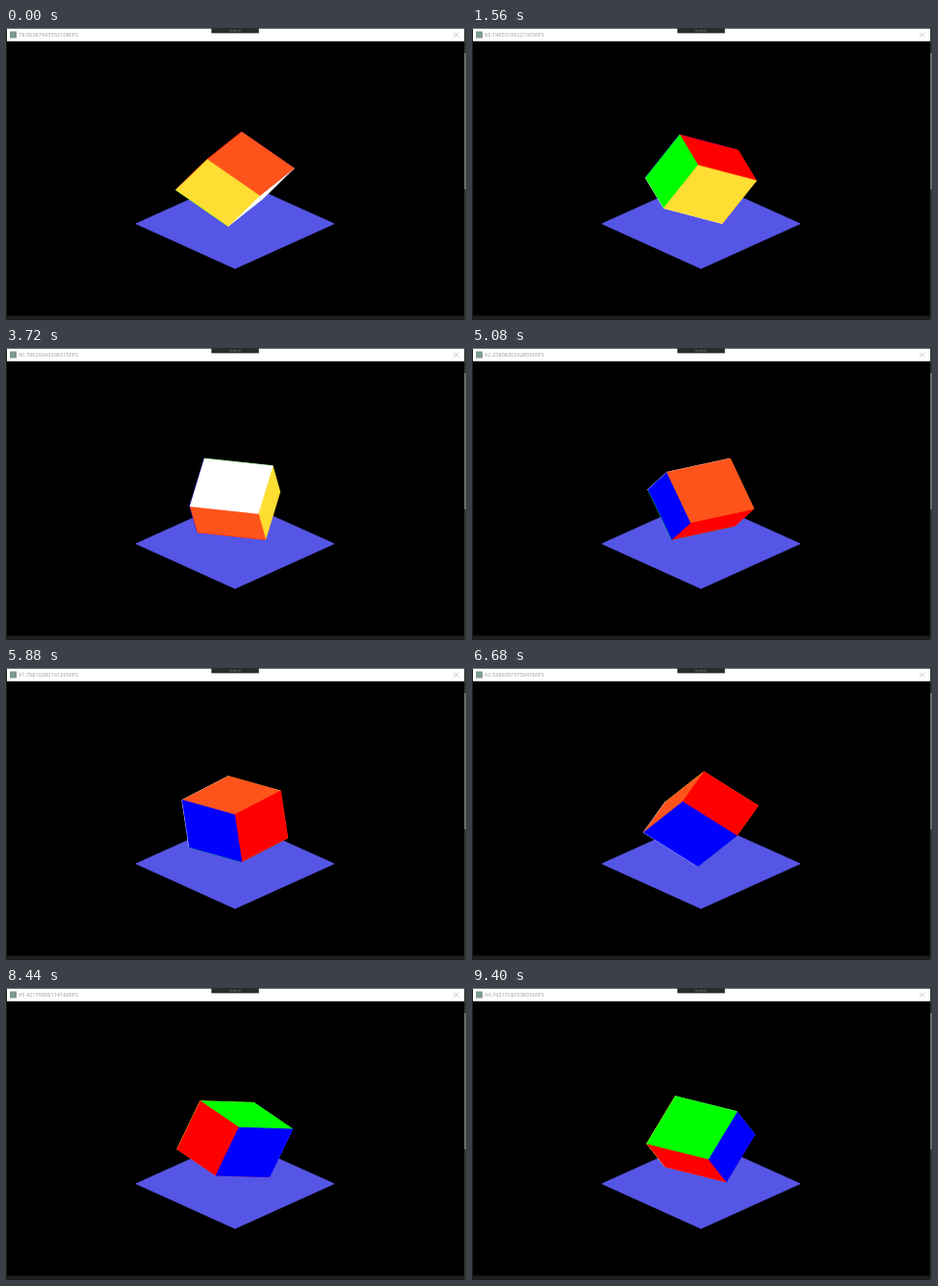
An HTML page that plays this animation: 478 px wide and 304 px high, repeating every 9.44 s.

```html
<!DOCTYPE html>
<html lang="en">
<head>
<meta charset="utf-8">
<title>Rotating cube</title>
<style>
  html, body { margin: 0; width: 100%; height: 100%; overflow: hidden; background: #000; }
  svg { display: block; width: 478px; height: 304px; }
  polygon { stroke-width: .8; stroke-linejoin: round; }
  #title { font: 5.6px "Open Sans", "Noto Sans", sans-serif; fill: #999; }
  #tab { font: 3px "Open Sans", sans-serif; fill: #888; text-anchor: middle; }
</style>
</head>
<body>
<svg viewBox="0 0 478 304">
  <rect width="478" height="304"/>
  <polygon id="floor" fill="#5656e6" stroke="#5656e6"/>
  <g id="cube"></g>
  <rect width="1" height="300" fill="#1c1c1c"/>
  <rect width="478" height="1" fill="#555"/>
  <rect y="299.5" width="478" height="4.5" fill="#1e1e1e"/>
  <rect x="476.2" width="1.8" height="304" fill="#333"/>
  <rect x="476.2" y="26" width="1.8" height="142" fill="#707070"/>
  <rect x="1" y=".8" width="475.2" height="13" fill="#fff"/>
  <rect x="4" y="3.5" width="7" height="7" fill="#7d9a92"/>
  <rect x="213.4" width="49.4" height="5.4" fill="#2b2b2b"/>
  <text id="title" x="13" y="9.4"></text>
  <text id="tab" x="238" y="4">localhost</text>
  <path d="M465.3 4.7l5 5m0-5l-5 5" stroke="#aaa" stroke-width=".6"/>
</svg>
<script>
const LOOP = 9440, STEP = 40;
const EDGE_X = 72.8, EDGE_Y = 57;          // projected length of one cube edge
const CENTER = [238, 157.3];

// front and back colour along each cube axis
const COLORS = [['#ffffff', '#ff0000'], ['#ff531c', '#00ff00'], ['#ffde33', '#0000ff']];

const byId = id => document.getElementById(id);
const noise = n => {
  const s = Math.sin(n * 127.1 + 3.7) * 43758.5453;
  return (s - Math.floor(s)) * 2 - 1;
};

// steady turn that lags slightly in mid-loop
const turnAt = t => 15.45 + 0.0288 * t - 1.1 * Math.sin(Math.PI * t / LOOP) ** 2;

// frame rate climbs, then levels off
const rateAt = t => 97 - 17 * Math.exp(-t / 4000) + 1.5 * noise(t / STEP);

// isometric view, squeezed vertically
function project([x, y, z], shift = 0) {
  return [
    CENTER[0] + shift + EDGE_X * (x - z) / Math.SQRT2,
    CENTER[1] + EDGE_Y * (x + z - 2 * y) / Math.sqrt(6)
  ];
}

const toPoints = (corners, shift) =>
  corners.map(c => project(c, shift).map(v => v.toFixed(2)).join()).join(' ');

function cubeAxes(degrees) {
  const yaw = degrees * Math.PI / 180, roll = -2 * yaw;
  const c = Math.cos(yaw), s = Math.sin(yaw);
  const p = Math.cos(roll), q = Math.sin(roll);
  return [[c * p, q, -s * p], [-c * q, p, s * q], [s, 0, c]];
}

// corners of a square spanned by a and b around a midpoint
const square = (mid, a, b) => [[1, 1], [1, -1], [-1, -1], [-1, 1]].map(([i, j]) =>
  mid.map((m, k) => m + a[k] * i + b[k] * j));

const half = v => v.map(n => n / 2);

const faces = COLORS.flatMap(([front, back], axis) => [
  { axis, side: 1, color: front },
  { axis, side: -1, color: back }
]);

for (const face of faces) {
  face.shape = document.createElementNS('http://www.w3.org/2000/svg', 'polygon');
  face.shape.setAttribute('fill', face.color);
  face.shape.setAttribute('stroke', face.color);
}

function drawCube(axes) {
  const depth = ({ axis, side }) => side * axes[axis].reduce((sum, v) => sum + v);
  faces.sort((a, b) => depth(a) - depth(b));
  for (const face of faces) {
    const [n, a, b] = [0, 1, 2].map(i => half(axes[(face.axis + i) % 3]));
    const corners = square(n.map(v => v * face.side), a, b);
    // rear faces peek out slightly along the left outline
    face.shape.setAttribute('points', toPoints(corners, depth(face) < 0 ? -0.35 : 0));
  }
  byId('cube').replaceChildren(...faces.map(face => face.shape));
}

function render(time) {
  const t = Math.floor(time % LOOP / STEP) * STEP;
  drawCube(cubeAxes(turnAt(t)));
  byId('title').textContent = rateAt(t).toFixed(14) + 'FPS';
}

byId('floor').setAttribute('points', toPoints(square([0, -1, 0], [1, 0, 0], [0, 0, 1])));

const start = performance.now();
function tick() {
  render(performance.now() - start);
  requestAnimationFrame(tick);
}
tick();
</script>
</body>
</html>
```
